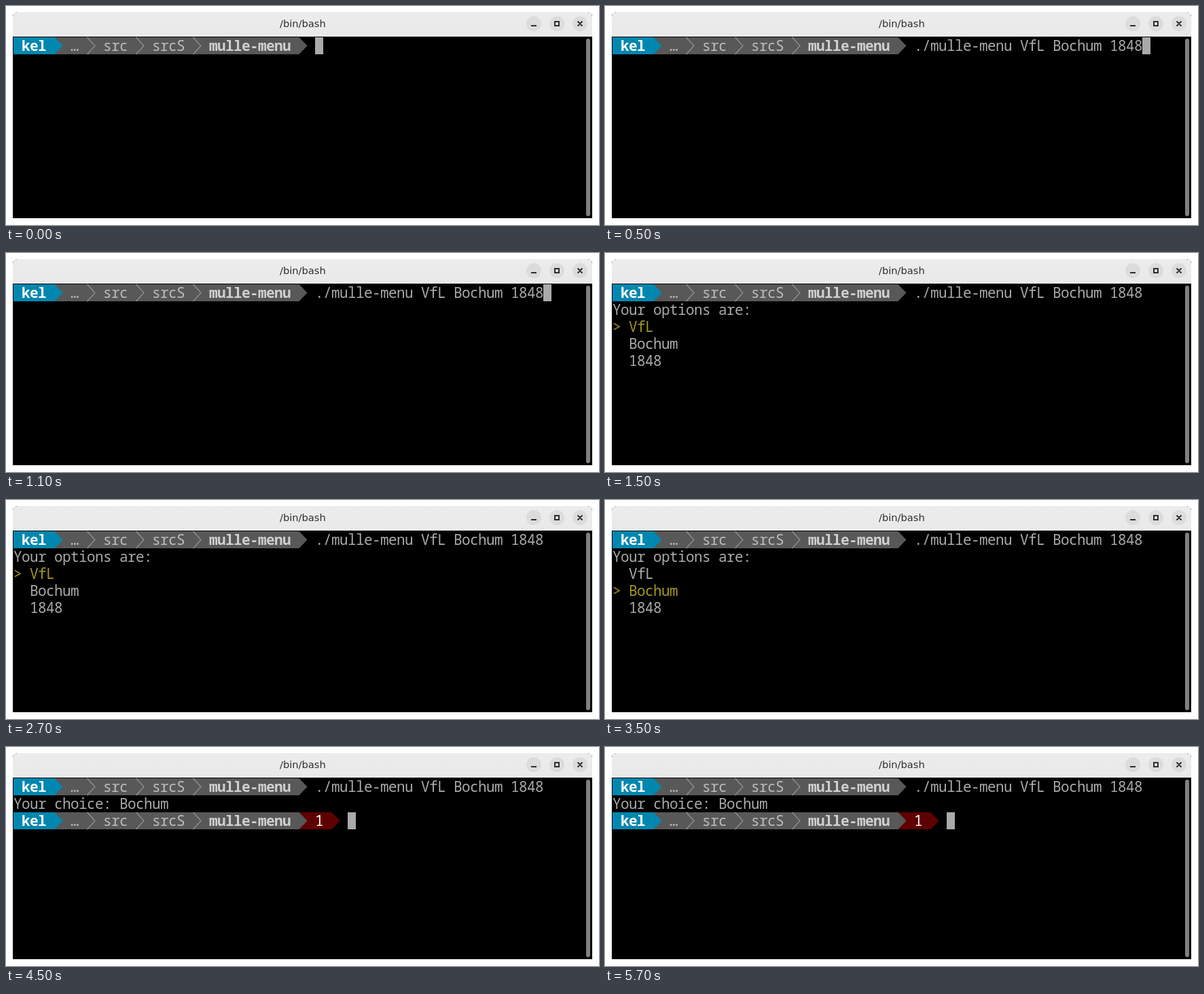
Recreate the animation shown at these times as an HTML page. Size 873 by 322 pixels, loop 6500 ms.

```html
<!DOCTYPE html>
<html lang="en">
<head>
<meta charset="utf-8">
<title>Terminal menu</title>
<style>
  html, body { margin: 0; width: 100%; height: 100%; overflow: hidden; background: #fff; }
  svg { display: block; }
  text { white-space: pre; font: 21px "Noto Sans Mono", "DejaVu Sans Mono", monospace; letter-spacing: -.6px; fill: #aaa; }
  .bold { font-weight: 700; }
  .user, .status { fill: #fff; }
  .dir { fill: #bcbcbc; }
  .here { fill: #d0d0d0; }
  .mark { fill: #a2981c; }
  .cursor { fill: #aaa; }
  .thin { fill: none; stroke: #949494; stroke-width: 1.2; }
  .title { font: 14.67px "DejaVu Sans", sans-serif; letter-spacing: 0; fill: #2e2e2e; }

  /* one 6.5 s loop: prompt, command, first item, second item, result */
  .idle, .typed, .command, .menu, .first, .second, .result { visibility: hidden; animation: 6.5s step-end infinite; }
  .idle { animation-name: idle; }
  .typed { animation-name: typed; }
  .command { animation-name: command; }
  .menu { animation-name: menu; }
  .first { animation-name: first; }
  .second { animation-name: second; }
  .result { animation-name: result; }
  .item1, .item2 { animation: 6.5s step-end infinite; }
  .item1 { animation-name: menu, lit1; }
  .item2 { animation-name: menu, lit2; }

  @keyframes idle { 0% { visibility: visible } 7.6923%, 100% { visibility: hidden } }
  @keyframes typed { 0% { visibility: hidden } 7.6923% { visibility: visible } 23.0769%, 100% { visibility: hidden } }
  @keyframes command { 0% { visibility: hidden } 7.6923%, 100% { visibility: visible } }
  @keyframes menu { 0% { visibility: hidden } 23.0769% { visibility: visible } 69.2308%, 100% { visibility: hidden } }
  @keyframes first { 0% { visibility: hidden } 23.0769% { visibility: visible } 53.8462%, 100% { visibility: hidden } }
  @keyframes second { 0% { visibility: hidden } 53.8462% { visibility: visible } 69.2308%, 100% { visibility: hidden } }
  @keyframes result { 0% { visibility: hidden } 69.2308%, 100% { visibility: visible } }
  @keyframes lit1 { 0% { fill: #a2981c } 53.8462%, 100% { fill: #aaa } }
  @keyframes lit2 { 0% { fill: #aaa } 53.8462%, 100% { fill: #a2981c } }
</style>
</head>
<body>
<svg width="873" height="322" viewBox="0 0 873 322">
  <defs>
    <linearGradient id="bar" x2="0" y2="1">
      <stop offset="0" stop-color="#ececec"/>
      <stop offset="1" stop-color="#e9e9e9"/>
    </linearGradient>
    <path id="chevron" class="thin" d="M.5 46 12 58.5.5 71"/>
    <g id="prompt">
      <path fill="#585858" d="M71 46H431.5L443.5 58.5 431.5 71H71z"/>
      <path fill="#0087af" d="M11 46H71.5L83.5 58.5 71.5 71H11z"/>
      <use href="#chevron" x="119"/>
      <use href="#chevron" x="191"/>
      <use href="#chevron" x="275"/>
      <text class="bold user" x="23" y="66">kel</text>
      <text class="dir" x="95" y="66">…</text>
      <text class="dir" x="143" y="66">src</text>
      <text class="dir" x="215" y="66">srcS</text>
      <text class="bold here" x="299" y="66">mulle-menu</text>
    </g>
  </defs>

  <path d="M10 13 15 9H858L863 13V312H10z"/>
  <path fill="url(#bar)" d="M10 45V16Q10 9 17 9H856Q863 9 863 16V45z"/>
  <text class="title" x="403" y="31">/bin/bash</text>

  <g fill="#dcdcdc">
    <circle cx="777" cy="26" r="11"/>
    <circle cx="811" cy="26" r="11"/>
    <circle cx="845" cy="26" r="11"/>
  </g>
  <path fill="none" stroke="#2e2e2e" stroke-width="2" d="M773 29H781M808 23H814V29H808zM841.5 22.5 848.5 29.5M848.5 22.5 841.5 29.5"/>

  <rect x="854" y="48" width="6" height="261" rx="3" fill="#808080"/>

  <use href="#prompt"/>
  <rect class="cursor idle" x="455" y="46" width="12" height="25"/>
  <text class="command" x="455" y="66">./mulle-menu VfL Bochum 1848</text>
  <rect class="cursor typed" x="791" y="46" width="12" height="25"/>

  <text class="menu" x="11" y="91">Your options are:</text>
  <text class="mark first" x="11" y="116">&gt;</text>
  <text class="mark second" x="11" y="141">&gt;</text>
  <text class="item1" x="35" y="116">VfL</text>
  <text class="item2" x="35" y="141">Bochum</text>
  <text class="menu" x="35" y="166">1848</text>

  <g class="result">
    <text x="11" y="91">Your choice: Bochum</text>
    <path fill="#5f0000" d="M431 96H479.5L491.5 108.5 479.5 121H431z"/>
    <use href="#prompt" y="50"/>
    <text class="status" x="455" y="116">1</text>
    <rect class="cursor" x="503" y="96" width="12" height="25"/>
  </g>
</svg>
</body>
</html>
```
